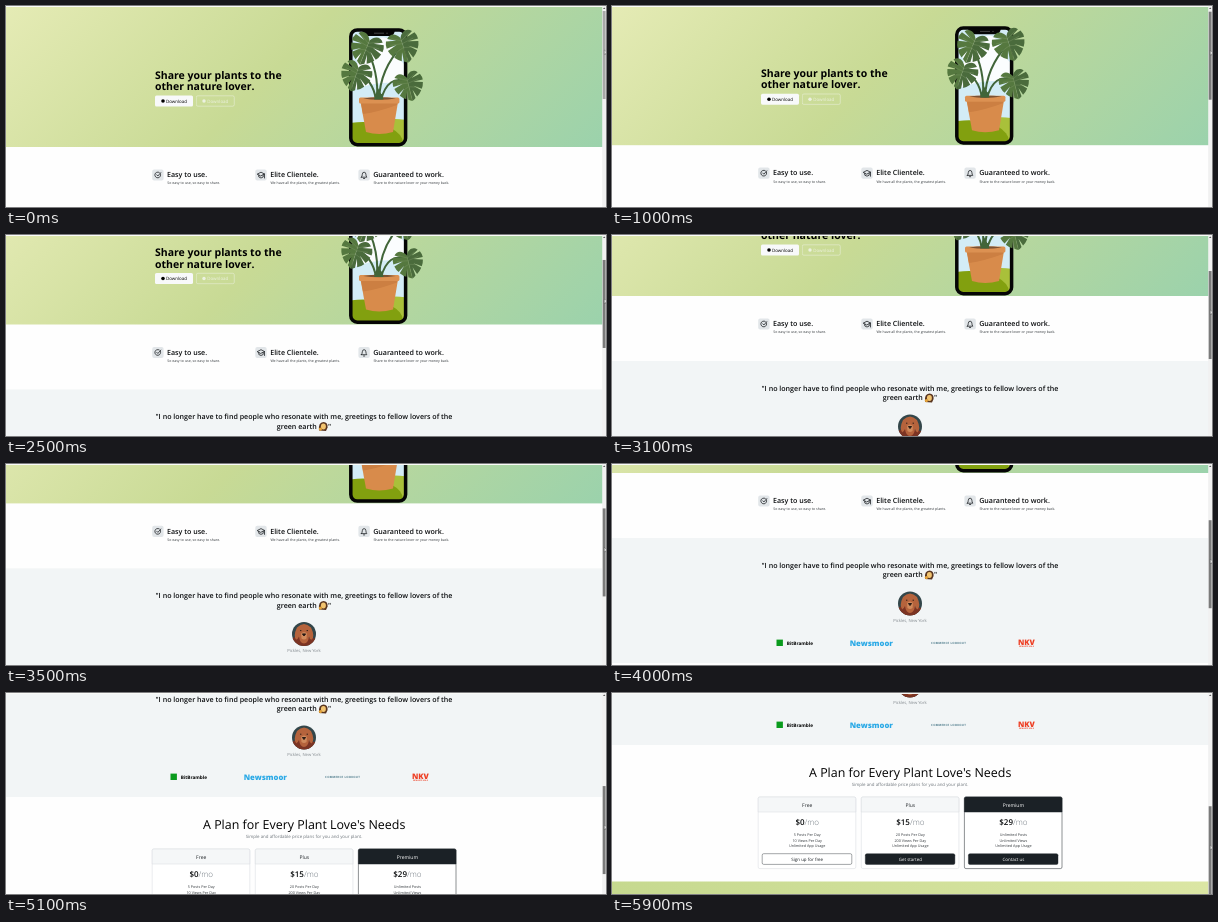
Animation of 600x201 px, one loop 6000 ms. Source, as an HTML page:

```html
<!DOCTYPE html>
<html lang="en">
<head>
<meta charset="utf-8">
<title>Plant sharing landing page</title>
<style>
@property --scroll { syntax: "<number>"; inherits: true; initial-value: 0; }
html, body { margin: 0; width: 100%; height: 100%; overflow: hidden; background: #fefefe; }
svg { display: block; }
#stage {
  width: 600px; height: 201px;
  font-family: "Open Sans", "Noto Sans", sans-serif;
  text-rendering: geometricPrecision;
  animation: scroll 6s -20ms infinite;
}
#page { transform: translateY(calc(var(--scroll) * -1px)); }
#thumb { transform: translateY(calc(var(--scroll) * .388px)); }
#thumb rect { animation: grab 6s -20ms step-end infinite; }

/* Dragged scrollbar, ten positions per second */
@keyframes scroll {
  0%, 15%  { --scroll: 0;    animation-timing-function: steps(5); }
  23.333%  { --scroll: 9;    animation-timing-function: steps(3); }
  28.333%  { --scroll: 22;   animation-timing-function: steps(4); }
  35%      { --scroll: 36;   animation-timing-function: steps(4); }
  41.666%  { --scroll: 51.5; animation-timing-function: steps(3); }
  46.666%  { --scroll: 65.2; animation-timing-function: steps(3); }
  51.666%  { --scroll: 80;   animation-timing-function: steps(5); }
  60%      { --scroll: 107;  animation-timing-function: steps(4); }
  66.666%  { --scroll: 132;  animation-timing-function: steps(5); }
  75%      { --scroll: 172;  animation-timing-function: steps(6); }
  85%      { --scroll: 227;  animation-timing-function: steps(4); }
  91.666%  { --scroll: 256;  animation-timing-function: steps(4); }
  98.333%, 100% { --scroll: 279; }
}
@keyframes grab { 0% { fill: #a8a8a8; } 15%, 100% { fill: #7b7b7b; } }

.mid { text-anchor: middle; }
.hero { font-size: 10.53px; font-weight: 700; }
.semi { font-size: 7.1px; font-weight: 600; fill: #0b0d0f; }
.sub { font-size: 3.55px; fill: #33383c; }
.btn { font-size: 4.45px; }
.plan { font-size: 5px; }
.price { font-size: 8px; font-weight: 600; fill: #0b0d0f; }
.per { font-weight: 300; fill: #6c757d; }
.item { font-size: 3.72px; fill: #33383c; }
.icon { fill: none; stroke: #212529; stroke-width: .8; stroke-linecap: round; stroke-linejoin: round; }
</style>
</head>
<body>
<svg id="stage" viewBox="0 0 600 201">
  <defs>
    <linearGradient id="meadow" gradientUnits="userSpaceOnUse" x1="113.75" y1="-113.75" x2="482.25" y2="254.75">
      <stop offset="0" stop-color="#e5ebb5"/>
      <stop offset=".45" stop-color="#c8da95"/>
      <stop offset="1" stop-color="#9bd2ac"/>
    </linearGradient>
    <linearGradient id="footer">
      <stop offset="0" stop-color="#c6d98f"/>
      <stop offset="1" stop-color="#dbe6a4"/>
    </linearGradient>
    <clipPath id="screen"><rect x="346" y="25" width="52.5" height="113" rx="5"/></clipPath>
    <clipPath id="round"><circle cx="298" cy="271.5" r="12"/></clipPath>
    <path id="half" d="M0-8C3-14 9-16 13-11L5-6.5 15-9Q17-5 16.5-2L6-2.5 16 .5Q15 5 13 7.5L5 2 12 9Q9 13 6 14.5L3 6 4 15.5Q2 17 0 18Z"/>
    <g id="leaf">
      <use href="#half" fill="#4a6b3c"/>
      <use href="#half" fill="#55783f" transform="scale(-1 1)"/>
      <path d="M0-8V16M0-5L9-10M0-5L-9-10M0-2L12-4M0-2L-12-4M0 2L10 5M0 2L-10 5" fill="none" stroke="#7f9a68" stroke-width=".35"/>
    </g>
  </defs>

  <rect width="600" height="201" fill="#fefefe"/>
  <g id="page">
    <rect width="597" height="141" fill="url(#meadow)"/>
    <text class="hero" x="149" y="72.7">Share your plants to the</text>
    <text class="hero" x="149" y="84">other nature lover.</text>
    <rect x="149" y="89.5" width="38" height="11" rx="1.6" fill="#f8f9fa"/>
    <circle cx="157" cy="95" r="1.8"/>
    <text class="btn" x="160" y="96.6">Download</text>
    <g opacity=".75">
      <rect x="190.3" y="89.8" width="38" height="10.4" rx="1.6" fill="none" stroke="#f8f9fa" stroke-width=".5"/>
      <circle cx="198" cy="95" r="1.7" fill="#f8f9fa"/>
      <text class="btn" x="201.3" y="96.6" fill="#f8f9fa">Download</text>
    </g>

    <!-- phone -->
    <g clip-path="url(#screen)">
      <rect x="345" y="24" width="54" height="115" fill="#d3ecf6"/>
      <path d="M352 58Q348 49 357 47Q357 31 371 33Q383 27 387 42Q398 43 395 55L399 59V80Q380 72 346 84V62Z" fill="#fbfdfe"/>
      <ellipse cx="389" cy="134" rx="38" ry="21" fill="#a9c03a"/>
      <ellipse cx="357" cy="137" rx="40" ry="21" fill="#82a00f"/>
    </g>
    <rect x="344.8" y="23.9" width="54.8" height="114.8" rx="6.5" fill="none" stroke="#050505" stroke-width="3.5"/>
    <path d="M356 24H389Q388 30 384 30H361Q357 30 356 24Z" fill="#050505"/>
    <path d="M368 27.2H378" stroke="#555" stroke-width=".8"/>
    <circle cx="381" cy="27.2" r=".6" fill="#555"/>

    <!-- plant -->
    <g fill="none" stroke="#416539" stroke-width="2">
      <path d="M371 94Q373 65 360 42"/>
      <path d="M370 94Q367 73 350 66"/>
      <path d="M373 94Q374 63 396 40"/>
      <path d="M375 94Q382 68 401 76"/>
    </g>
    <use href="#leaf" transform="translate(360.5 42) rotate(22)"/>
    <use href="#leaf" transform="translate(350 69) rotate(18) scale(.95)"/>
    <use href="#leaf" transform="translate(397 39.5) rotate(-18)"/>
    <use href="#leaf" transform="translate(402.5 79) rotate(-14) scale(.92)"/>
    <path d="M367 94Q370 88 372 82Q376 89 378 94Z" fill="#416539"/>
    <path d="M354.5 96H392L387 126Q373 130 360 126Z" fill="#d88b4b"/>
    <path d="M355 97L357 108Q372 106 391 99L391.6 96H355Z" fill="#cc7f42"/>
    <rect x="353" y="91.5" width="40.4" height="6" rx="1.5" fill="#dc9152"/>
    <path d="M357 92.4Q373 90 390 92.4Q373 95 357 92.4Z" fill="#7d5233"/>
    <path d="M368 93.4L370 88H376L377.5 93.4Z" fill="#416539"/>

    <!-- features -->
    <g fill="#e2e6e9">
      <rect x="146.2" y="163.4" width="11.4" height="11.2" rx="2"/>
      <rect x="249.3" y="163.4" width="11.4" height="11.2" rx="2"/>
      <rect x="352.4" y="163.4" width="11.4" height="11.2" rx="2"/>
    </g>
    <g class="icon">
      <path d="M154.4 167.7A2.9 2.9 0 1 1 153.2 166.4M150.7 168.8L151.9 170 154.8 166.6"/>
      <path d="M251.5 168L255 166.2 258.5 168 255 169.8ZM252.8 169V171Q255 173 257.2 171V169M258.5 168V172"/>
      <path d="M355.4 171.2H360.8Q359.9 170.1 359.9 168.3Q359.8 166.2 358.1 166.2T356.3 168.3Q356.3 170.1 355.4 171.2ZM357.5 172.5H358.7"/>
    </g>
    <text class="semi" x="161" y="171.2">Easy to use.</text>
    <text class="semi" x="264.2" y="171.2">Elite Clientele.</text>
    <text class="semi" x="367.2" y="171.2">Guaranteed to work.</text>
    <text class="sub" x="161.2" y="178.4">So easy to use, so easy to share.</text>
    <text class="sub" x="264.4" y="178.4">We have all the plants, the greatest plants.</text>
    <text class="sub" x="367.4" y="178.4">Share to the nature lover or your money back.</text>

    <!-- testimonial -->
    <rect y="206" width="597" height="125" fill="#f2f5f6"/>
    <text class="semi mid" x="298" y="235.8">"I no longer have to find people who resonate with me, greetings to fellow lovers of the</text>
    <text class="semi" x="270.8" y="245.3">green earth</text>
    <path d="M313 247Q312 239 317.5 238.6Q322 239 321.6 244L320 247.5Z" fill="#59351f"/>
    <ellipse cx="317.4" cy="243" rx="2.5" ry="3" fill="#f2c470"/>
    <circle cx="314.4" cy="245.6" r="1.6" fill="#e5a33a"/>
    <text class="semi" x="321.9" y="245.3">"</text>
    <g clip-path="url(#round)">
      <rect x="286" y="259" width="24" height="25" fill="#33464a"/>
      <path d="M286 276Q292 272 298 274T310 276V284H286Z" fill="#7c3423"/>
      <path d="M291 265Q298 258 305 265Q309 273 306 277Q304 278 303 274Q302 281 298 281T293 274Q291 278 290 277Q287 273 291 265Z" fill="#b5633c"/>
      <path d="M295 271Q298 268 301 271L300.5 276Q298 278 295.5 276Z" fill="#d08a5c"/>
      <path d="M296.4 271.5H299.6L298 273.6ZM294 268.2H295.4M300.6 268.2H302" fill="#231713" stroke="#231713" stroke-width=".9"/>
    </g>
    <text class="mid" x="298" y="290" font-size="4.2" fill="#858b90">Pickles, New York</text>

    <!-- press -->
    <rect x="164.5" y="307.6" width="6.4" height="6.4" fill="#0a9b1d"/>
    <text x="174.8" y="312.6" font-size="4.65" font-weight="700">BitBramble</text>
    <text class="mid" x="259.3" y="313.8" font-size="7.7" font-weight="800" fill="#2aa9e6">Newsmoor</text>
    <text class="mid" x="336.6" y="311.9" font-size="2.9" font-weight="600" letter-spacing=".25" fill="#2f6477">COMMERCE LOOKOUT</text>
    <text class="mid" x="414.4" y="312.6" font-size="7.6" font-weight="800" fill="#ee3f24">NKV</text>
    <text class="mid" x="414.4" y="315.1" font-size="2" font-weight="700" fill="#ee3f24">NEW KITE VALE</text>

    <!-- pricing -->
    <text class="mid" x="298.2" y="362.5" font-size="12.45">A Plan for Every Plant Love's Needs</text>
    <text class="mid" x="298" y="372.2" font-size="4.4" fill="#70777d">Simple and affordable price plans for you and your plant.</text>
    <g id="plans"></g>
    <rect y="467.5" width="597" height="60" fill="url(#footer)"/>
  </g>

  <!-- browser edge -->
  <rect width="600" height="1" fill="#fafbf8"/>
  <rect x="596.2" width="3.8" height="201" fill="#f1f1f1"/>
  <path d="M597 3L598.2 1.6 599.4 3Z" fill="#555"/>
  <g id="thumb">
    <rect x="596.7" y="5" width="2.9" height="88"/>
    <path d="M598.4 44V48.4L599.4 47.5 600 48.8V45.6Z" fill="#fff" stroke="#222" stroke-width=".3"/>
  </g>
</svg>
<script>
const dark = "#1b2126";
const plans = [
  { name: "Free", price: 0, posts: "5 Posts Per Day", views: "10 Views Per Day", cta: "Sign up for free", outline: true },
  { name: "Plus", price: 15, posts: "20 Posts Per Day", views: "200 Views Per Day", cta: "Get started" },
  { name: "Premium", price: 29, posts: "Unlimited Posts", views: "Unlimited Views", cta: "Contact us", featured: true }
];

const label = (cls, y, text, fill) =>
  `<text class="${cls} mid" x="49" y="${y}"${fill ? ` fill="${fill}"` : ""}>${text}</text>`;

const card = (p, i) => {
  const edge = p.featured ? dark : "#d5d9dc";
  const items = [p.posts, p.views, "Unlimited App Usage"];
  return `<g transform="translate(${146.2 + i * 103.1} 383)">
    <rect width="97.6" height="71.6" rx="1.6" fill="#fff" stroke="${edge}" stroke-width=".5"/>
    <path d="M0 15V1.6Q0 0 1.6 0H96Q97.6 0 97.6 1.6V15Z" fill="${p.featured ? dark : "#f5f7f8"}" stroke="${edge}" stroke-width=".5"/>
    ${label("plan", 9.7, p.name, p.featured ? "#fff" : "#212529")}
    ${label("price", 27.5, `$${p.price}<tspan class="per">/mo</tspan>`)}
    ${items.map((t, n) => label("item", 38.8 + n * 5.7, t)).join("")}
    <rect x="4" y="56.7" width="89.6" height="10.7" rx="1.5" fill="${p.outline ? "#fff" : dark}" stroke="${dark}" stroke-width=".4"/>
    ${label("btn", 63.6, p.cta, p.outline ? dark : "#fff")}
  </g>`;
};

document.getElementById("plans").innerHTML = plans.map(card).join("");
</script>
</body>
</html>
```
